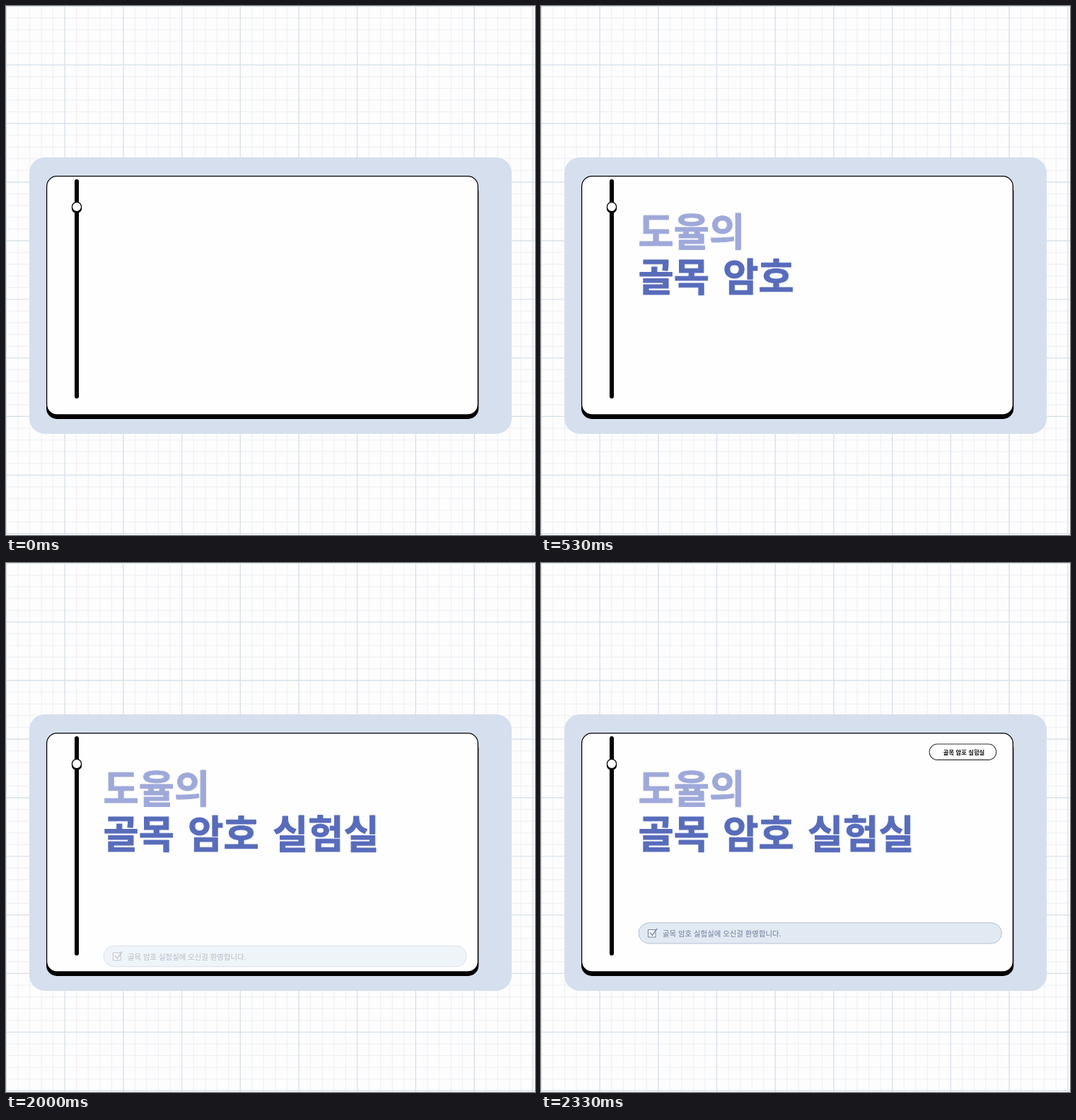
Write an HTML page that moves like this. It is 748 by 748 pixels and loops after 5010 ms.

```html
<!DOCTYPE html>
<html lang="ko">
<head>
<meta charset="utf-8">
<title>골목 암호 실험실</title>
<style>
  html, body { margin: 0; width: 100%; height: 100%; overflow: hidden; background: #fdfdfe; }
  svg { display: block; width: 100%; height: 100%; }
  text { font-family: "Noto Sans CJK KR", "Noto Sans CJK", "Noto Sans KR", sans-serif; white-space: pre; }
  .title { font-size: 54.6px; font-weight: 900; word-spacing: 4px; stroke-width: 1; stroke-linejoin: round; }
  .owner { fill: #9fa9d9; stroke: #9fa9d9; }
  .name { fill: #586cbb; stroke: #586cbb; }
  .minor { stroke: #f0f1f4; }
  .cols { stroke: #d8dfee; }
  .rows { stroke: #d6e1e9; }
  .note { font-size: 10.4px; fill: #6a7998; }
  .tag { font-size: 8.4px; font-weight: 700; fill: #111; }
</style>
</head>
<body>
<svg viewBox="0 0 748 748">
  <g id="grid" fill="none" stroke-width="1.2"></g>

  <rect x="33" y="214" width="682" height="391" rx="22" fill="#d6dfed"/>
  <rect x="57" y="247" width="611.3" height="337" rx="15"/>
  <rect x="57.6" y="240.6" width="609.8" height="337.4" rx="14.5" fill="#fefefe" stroke="#000" stroke-width="1.3"/>

  <rect x="97" y="245" width="6" height="310" rx="3"/>
  <circle cx="100" cy="286" r="7.2"/>
  <circle cx="100" cy="284" r="6.6" fill="#fff" stroke="#000" stroke-width="1.3"/>

  <text class="title owner" x="137.5" y="339" data-type="도율의"></text>
  <text class="title name" x="137.5" y="402.5" data-type="골목 암호 실험실"></text>

  <g id="note">
    <rect x="138" y="508.7" width="513.3" height="29.3" rx="14.65" fill="#e1eaf2" stroke="#b4c1d3"/>
    <g fill="none" stroke="#77839d">
      <rect x="151.5" y="518.5" width="10.5" height="10.5" fill="#f4f7fa"/>
      <path d="M154 522.3L157.4 526.4L164.3 516.8" stroke-width="1.3"/>
    </g>
    <text class="note" x="172" y="528">골목 암호 실험실에 오신걸 환영합니다.</text>
  </g>

  <g id="tag">
    <rect x="549.2" y="256" width="94.5" height="22.4" rx="11.2" fill="#fefefe" stroke="#333" stroke-width="1.1"/>
    <text class="tag" x="598" y="270.5" text-anchor="middle">골목 암호 실험실</text>
  </g>
</svg>
<script>
  const NS = "http://www.w3.org/2000/svg";
  const LOOP = 5010, FPS = 30, RISE = 63;
  const $ = id => document.getElementById(id);

  function add(parent, tag, attrs) {
    const el = document.createElementNS(NS, tag);
    for (const k in attrs) el.setAttribute(k, attrs[k]);
    return parent.appendChild(el);
  }

  // Paper grid: five minor cells per major cell
  function lines(step, start, draw) {
    let d = "";
    for (let p = start; p < 748; p += step) d += draw(p.toFixed(2));
    return d;
  }
  const col = p => `M${p} 0V748`, row = p => `M0 ${p}H748`;
  const GX = 82.7, GY = 82.85;
  const grid = $("grid");
  add(grid, "path", { class: "minor", d: lines(GX / 5, 0.5, col) + lines(GY / 5, 0.5, row) });
  add(grid, "path", { class: "cols", d: lines(GX, 0.5, col) });
  add(grid, "path", { class: "rows", d: lines(GY, 0.5, row) });

  // One span per typed letter
  const letters = [];
  document.querySelectorAll("[data-type]").forEach(line => {
    for (const ch of line.dataset.type) {
      const span = add(line, "tspan", {});
      span.textContent = ch;
      if (ch !== " ") letters.push(span);
    }
  });
  const typedAt = [30, 100, 170, 230, 330, 470, 530, 670, 750, 830];

  function rise(el, t, start, end) {
    const p = Math.min(1, Math.max(0, (t - start) / (end - start)));
    const y = RISE * (1 + Math.cos(Math.PI * p)) / 2;
    el.setAttribute("transform", `translate(0 ${y.toFixed(2)})`);
    el.setAttribute("opacity", p.toFixed(3));
  }

  function render(now) {
    const t = Math.floor((now % LOOP + 3.4) * FPS / 1000) * 1000 / FPS;
    letters.forEach((el, i) => {
      el.style.visibility = t + 4 >= typedAt[i] ? "visible" : "hidden";
    });
    rise($("note"), t, 1838, 2170);
    rise($("tag"), t, 2025, 2330);
  }

  function tick(now) {
    render(now);
    requestAnimationFrame(tick);
  }
  render(0);
  requestAnimationFrame(tick);
</script>
</body>
</html>
```
